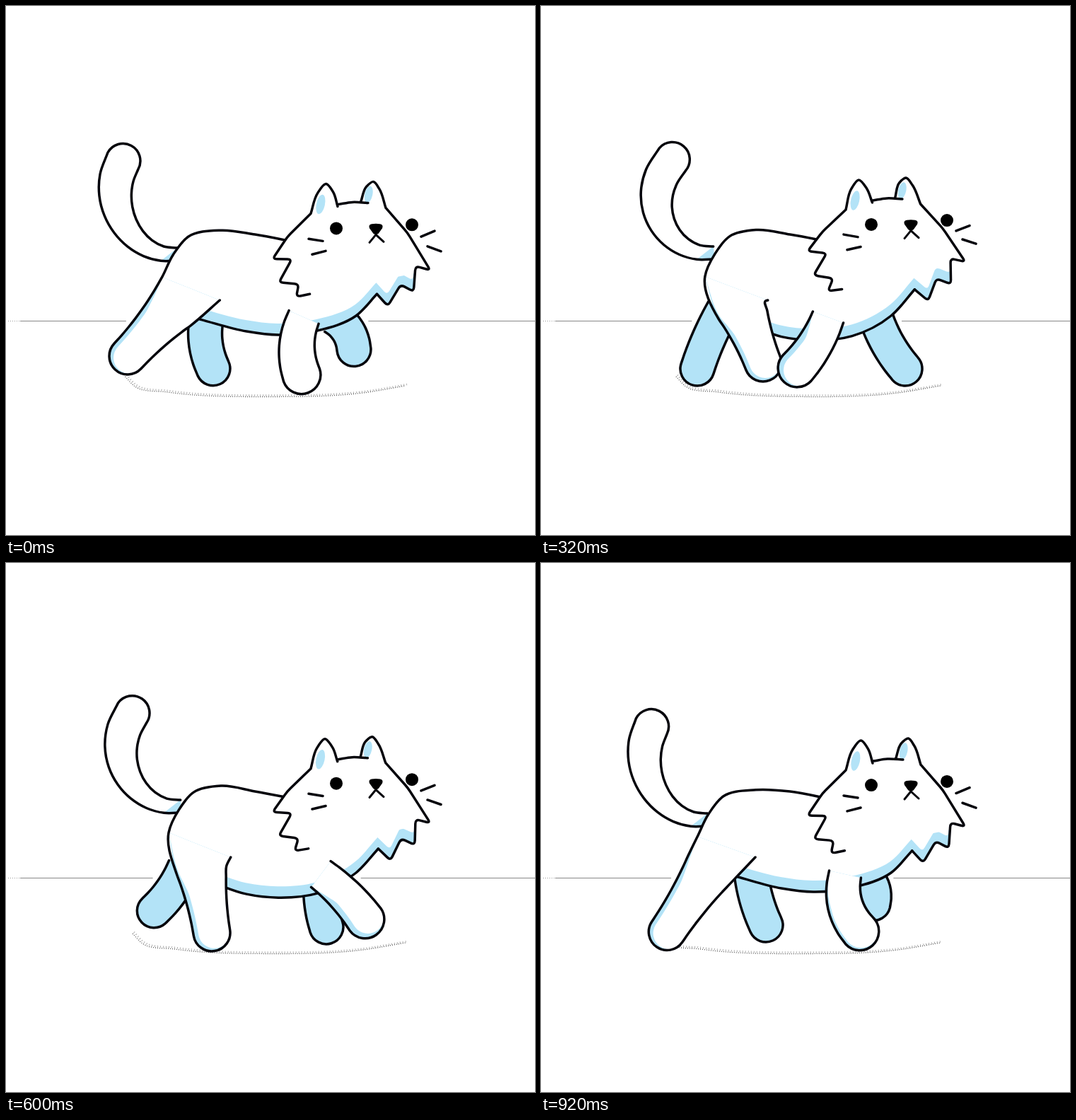
These frames come from a looping animation (748x748 px, 0.96 s). An HTML page:

```html
<!DOCTYPE html>
<html lang="en">
<head>
<meta charset="utf-8">
<title>Walking cat</title>
<style>
  html, body { margin: 0; width: 100%; height: 100%; overflow: hidden; background: #fff; }
  svg { display: block; width: 100vw; height: 100vh; }
  .line { fill: none; stroke: #05050c; stroke-width: 3.5; stroke-linecap: round; stroke-linejoin: round; }
  .blue { fill: #b3e3f7; }
  .white { fill: #fff; }
  .halo { fill: #fff; stroke: #fff; stroke-width: 16; }
  .shadow { fill: none; stroke: #555; stroke-width: 1.3; stroke-dasharray: 1 2; }
  .soft { stroke: #aaa; stroke-width: 2.5; stroke-dasharray: 1 3; }
</style>
</head>
<body>
<svg viewBox="0 0 748 748">
  <defs>
    <clipPath id="bodyClip"><path id="bodyMask"/></clipPath>
    <clipPath id="hindClip"><path id="hindMask"/></clipPath>
    <clipPath id="foreClip"><path id="foreMask"/></clipPath>
  </defs>
  <path d="M3 445.5H20" stroke="#999" stroke-dasharray="1 2"/>
  <path d="M20 445.5H748" stroke="#888"/>
  <path id="halo" class="halo"/>
  <path id="shadowSoft" class="shadow soft"/>
  <path id="shadow" class="shadow"/>

  <path id="farHindFill" class="blue"/>
  <path id="farHind" class="line"/>
  <path id="farForeFill" class="blue"/>
  <path id="farFore" class="line"/>
  <path id="tailFill" class="white"/>
  <path id="tailTint" class="blue"/>
  <path id="tail" class="line"/>

  <g clip-path="url(#bodyClip)">
    <rect class="blue" width="748" height="748"/>
    <path id="bodyLit" class="white" transform="translate(-1 -16)"/>
  </g>
  <path id="belly" class="line"/>
  <g clip-path="url(#hindClip)">
    <rect class="blue" width="748" height="748"/>
    <path id="hindLit" class="white"/>
  </g>
  <path id="back" class="line"/>

  <path id="headFill" class="white"/>
  <ellipse id="earL" class="blue" rx="6" ry="14"/>
  <ellipse id="earR" class="blue" rx="5.5" ry="12"/>
  <path id="head" class="line"/>
  <path id="whiskers" class="line"/>
  <circle id="eyeL" r="9"/>
  <circle id="eyeR" r="9"/>
  <g id="nose">
    <path class="line" d="M-9 19L0 8L11 18" style="stroke-width:3"/>
    <path d="M-6-7Q0-8 6-7Q11-6 9-1L4 6Q0 10-4 6L-9-1Q-11-6-6-7Z"/>
  </g>

  <g clip-path="url(#foreClip)">
    <rect class="blue" width="748" height="748"/>
    <path id="foreLit" class="white"/>
  </g>
  <path id="fore" class="line"/>
</svg>
<script>
const STEP = 40, LOOP = 960, CYCLE = 920;

// Walk keys: paw positions and the height of the tail base
const KEYS = [0, 160, 280, 440, 560, 720, 880];
const PAWS = {
  hind: [[172, 495], [208, 481], [314, 505], [320, 524], [291, 523], [229, 522], [178, 522]],
  fore: [[418, 522], [382, 521], [362, 512], [466, 502], [508, 504], [527, 524], [451, 521]],
  farHind: [[293, 513], [252, 514], [221, 513], [211, 504], [209, 492], [289, 499], [318, 512]],
  farFore: [[492, 486], [543, 508], [515, 513], [474, 516], [453, 515], [404, 514], [470, 482]]
};
const REAR = [[351], [340], [349], [352], [344], [333], [363]];

// Head at rest
const HEAD = {
  mane: [[430, 408], [411, 412], [414, 394], [386, 392], [404, 359], [377, 359], [398, 327], [431, 294]],
  earL: [[431, 294], [441, 265], [453, 252], [463, 264], [469, 284]],
  top: [[470, 281], [490, 278], [512, 279]],
  earR: [[502, 277], [510, 256], [520, 249], [528, 259], [537, 286]],
  cheek: [[537, 286], [568, 322], [600, 375], [579, 369], [576, 405], [558, 395], [539, 425], [524, 408]],
  whiskers: [[428, 330], [448, 333], [433, 352], [452, 347], [587, 327], [606, 319], [596, 341], [615, 348]]
};
const SPOTS = { eyeL: [467, 315], eyeR: [574, 310], nose: [523, 316], earL: [445, 281], earR: [513, 267] };

const $ = id => document.getElementById(id);
const draw = (id, d) => $(id).setAttribute('d', d);
const mix = (a, b, k) => a.map((v, i) => v + (b[i] - v) * k);
const dist = (a, b) => Math.hypot(b[0] - a[0], b[1] - a[1]) || 1e-6;
const fmt = p => p[0].toFixed(2) + ' ' + p[1].toFixed(2);
const clamp = v => Math.max(0, Math.min(1, v));
// Cosine wave peaking at `peak`, `beats` times per cycle
const wave = (t, peak, beats = 1) => Math.cos(2 * Math.PI * beats * (t - peak) / CYCLE);

// Cyclic cubic interpolation of a track at time t
function sample(track, t) {
  const n = KEYS.length;
  const time = i => KEYS[(i + n) % n] + CYCLE * Math.floor(i / n);
  const row = i => track[(i + n) % n];
  t = (t + CYCLE) % CYCLE;
  let i = n - 1;
  while (KEYS[i] > t) i--;
  const w = time(i + 1) - time(i), s = (t - time(i)) / w, r = 1 - s;
  const ka = w / (time(i + 1) - time(i - 1)), kb = w / (time(i + 2) - time(i));
  return row(i).map((a, j) => {
    const b = row(i + 1)[j];
    const ma = (b - row(i - 1)[j]) * ka, mb = (row(i + 2)[j] - a) * kb;
    return a * (1 + 2 * s) * r * r + b * s * s * (3 - 2 * s) + ma * s * r * r - mb * s * s * r;
  });
}

// Smooth curve through points, tangents weighted by chord length
function curve(p, start = 'M') {
  const n = p.length, tan = p.map((q, i) => {
    const a = p[Math.max(0, i - 1)], b = p[Math.min(n - 1, i + 1)];
    const la = dist(a, q), lb = dist(q, b);
    if (i === 0 || i === n - 1) return [0, 1].map(k => (b[k] - a[k]) / dist(a, b));
    return [0, 1].map(k => ((q[k] - a[k]) / la * lb + (b[k] - q[k]) / lb * la) / (la + lb));
  });
  let d = start + fmt(p[0]);
  for (let i = 1; i < n; i++) {
    const l = dist(p[i - 1], p[i]) / 3;
    const c = p[i - 1].map((v, k) => v + tan[i - 1][k] * l);
    const e = p[i].map((v, k) => v - tan[i][k] * l);
    d += `C${fmt(c)} ${fmt(e)} ${fmt(p[i])}`;
  }
  return d;
}

// Polyline with rounded corners
function rounded(p, start = 'M', r = 6) {
  let d = start + fmt(p[0]);
  for (let i = 1; i < p.length - 1; i++) {
    const toward = q => mix(p[i], q, Math.min(.5, r / dist(p[i], q)));
    d += `L${fmt(toward(p[i - 1]))}Q${fmt(p[i])} ${fmt(toward(p[i + 1]))}`;
  }
  return d + 'L' + fmt(p[p.length - 1]);
}

// Both edges of a tube around a Bezier spine; inset pulls in the shaded edge
function tube(spine, width, { from = 0, inset = 0, n = 6 } = {}) {
  const left = [], right = [];
  for (let i = 0; i <= n; i++) {
    const s = from + (1 - from) * i / n;
    let p = spine;
    while (p.length > 2) p = p.slice(1).map((q, j) => mix(p[j], q, s));
    const [a, b] = p, c = mix(a, b, s), l = dist(a, b), w = width(s);
    const side = k => [c[0] + k * (b[1] - a[1]) / l, c[1] - k * (b[0] - a[0]) / l];
    left.push(side(inset * clamp(2 * s) - w));
    right.unshift(side(w));
  }
  return { left, right };
}

// Outline of a tube with a round end, optionally led in and out by more points
function outline({ left, right }, before = [], after = []) {
  const a = left[left.length - 1], r = dist(a, right[0]) / 2;
  return curve([...before, ...left]) + `A${r} ${r} 0 0 0 ${fmt(right[0])}` + curve([...right, ...after], 'L');
}

// Spine of a leg that bows toward its direction of travel
function leg(name, t, hipAt) {
  const paw = sample(PAWS[name], t), hip = hipAt(paw[0]);
  const speed = (sample(PAWS[name], t + 20)[0] - sample(PAWS[name], t - 20)[0]) / 40;
  const mid = mix(hip, paw, .5), bow = 30 * speed / dist(hip, paw);
  return [hip, [mid[0] + (paw[1] - hip[1]) * bow, mid[1] - (paw[0] - hip[0]) * bow], paw];
}

// Head lift: the sides rise more than the middle, ears lean and chin tufts spread
const raise = lift => ([x, y]) => {
  const low = clamp((y - 300) / 60), edge = clamp(Math.abs(x - 480) / 110) ** 2;
  const dx = Math.min(0, y - 290) * .12 + Math.max(0, y - 390) * .3 * Math.sign(x - 480);
  return [x + dx * lift, y - (7.5 + 9 * edge * low) * lift];
};

function pose(t) {
  const up = raise(.5 + .42 * wave(t, 225, 2));
  const sway = wave(t, 340);
  const [rear] = sample(REAR, t);

  // Ground shadow
  const sl = 178 + 14 * sway, sr = 565;
  const ground = [[sl, 524], [sl + 14, 538], [sl + 60, 546], [375, 552.5], [sr - 60, 547], [sr, 537]];
  draw('shadow', curve(ground));
  draw('shadowSoft', curve(ground.map(([x, y]) => [x + 2, y - 2])));

  // Far legs
  const far = {
    farHind: leg('farHind', t, x => [275 + .4 * (x - 265), 430]),
    farFore: leg('farFore', t, x => [460 + .45 * (x - 485), 440])
  };
  let halo = '';
  for (const id in far) {
    const d = outline(tube(far[id], () => 24));
    draw(id, d);
    draw(id + 'Fill', d);
    halo += d + 'Z';
  }

  // Tail
  const bx = 246 - .6 * (rear - 347);
  const spine = [[0, 0], [-62, 8], [-112, -70], [12 * sway - 70, -132]].map(([x, y]) => [bx + x, rear + y]);
  const tail = tube(spine, s => 9 + 15.5 * Math.sin(s * Math.PI / 2) ** 1.5, { n: 8 });
  const tailLine = outline(tail);
  draw('tailFill', tailLine + 'Z');
  draw('tail', tailLine);
  draw('tailTint', `M${fmt(tail.left[0])}L${tail.right.slice(-2).map(fmt).join('L')}Z`);

  // Hind leg and the back that flows into it
  const thigh = leg('hind', t, x => [256 + .13 * (x - 170), 405]);
  thigh[1] = mix(thigh[0], thigh[2], .5);
  const hx = thigh[0][0], lean = hx - 265, ridge = 316 + .3 * (rear - 347);
  const back = [[410, 334], [352, 323], [304, ridge], [262 + lean * .5, ridge + 9],
                [241 + lean * .5, ridge + 34], [226 + lean * .6, ridge + 66]];
  const thick = s => 26 + 17 * (1 - s) ** 2;
  const hind = tube(thigh, thick, { from: .25 }), hindLit = tube(thigh, thick, { from: .25, inset: 7 });
  const rump = [back[5]], crease = [[hx + 46, 416]];
  const hindMask = outline(hind, rump, crease) + 'Z';
  draw('hindMask', hindMask);
  draw('hindLit', outline(hindLit, rump, crease) + 'Z');
  draw('back', outline(hind, back, crease));

  // Head
  const h = {};
  for (const key in HEAD) h[key] = HEAD[key].map(up);
  const { mane, earL, top, earR, cheek, whiskers: w } = h;
  const ears = curve(earL) + curve(top) + curve(earR);
  draw('head', rounded(mane) + ears + rounded(cheek));
  draw('headFill', rounded(mane) + curve(earL, 'L') + curve(top, 'L') + curve(earR, 'L') + rounded(cheek.slice(0, 3), 'L') + 'Z');
  draw('whiskers', [0, 2, 4, 6].map(i => `M${fmt(w[i])}L${fmt(w[i + 1])}`).join(''));
  for (const id in SPOTS) {
    const turn = id.startsWith('ear') ? ' rotate(12)' : '';
    $(id).setAttribute('transform', `translate(${fmt(up(SPOTS[id]))})${turn}`);
  }

  // Body and its shaded underside
  const sag = 470 + 5 * wave(t, 430);
  const under = [[hx + 18, sag - 22], [340, sag - 5], [385, sag], [440, sag - 6], [495, 438], cheek[7]];
  const tufts = rounded(cheek.slice(2).reverse(), 'L');
  const body = curve(back) + curve(under, 'L') + tufts + `L${fmt(cheek[0])}Z`;
  draw('bodyMask', body);
  draw('bodyLit', 'M0 0V748' + curve(under, 'L') + tufts + 'V0Z');
  draw('belly', curve(under));

  // Near front leg, shaded when it leans
  const arm = leg('fore', t, x => [427 + .27 * (x - 440), 440]);
  const inset = 9 * clamp(Math.abs(arm[2][0] - arm[0][0]) / 30) ** 2;
  const girth = s => 23 + 4 * s;
  const fore = outline(tube(arm, girth));
  draw('foreMask', fore + 'Z');
  draw('foreLit', outline(tube(arm, girth, { inset })) + 'Z');
  draw('fore', fore);

  draw('halo', halo + body + hindMask + fore + 'Z');
}

let shown = -1;
function tick() {
  const t = Math.floor(performance.now() % LOOP / STEP) * STEP;
  if (t !== shown) pose(Math.max(0, t - STEP));
  shown = t;
  requestAnimationFrame(tick);
}
tick();
</script>
</body>
</html>
```
